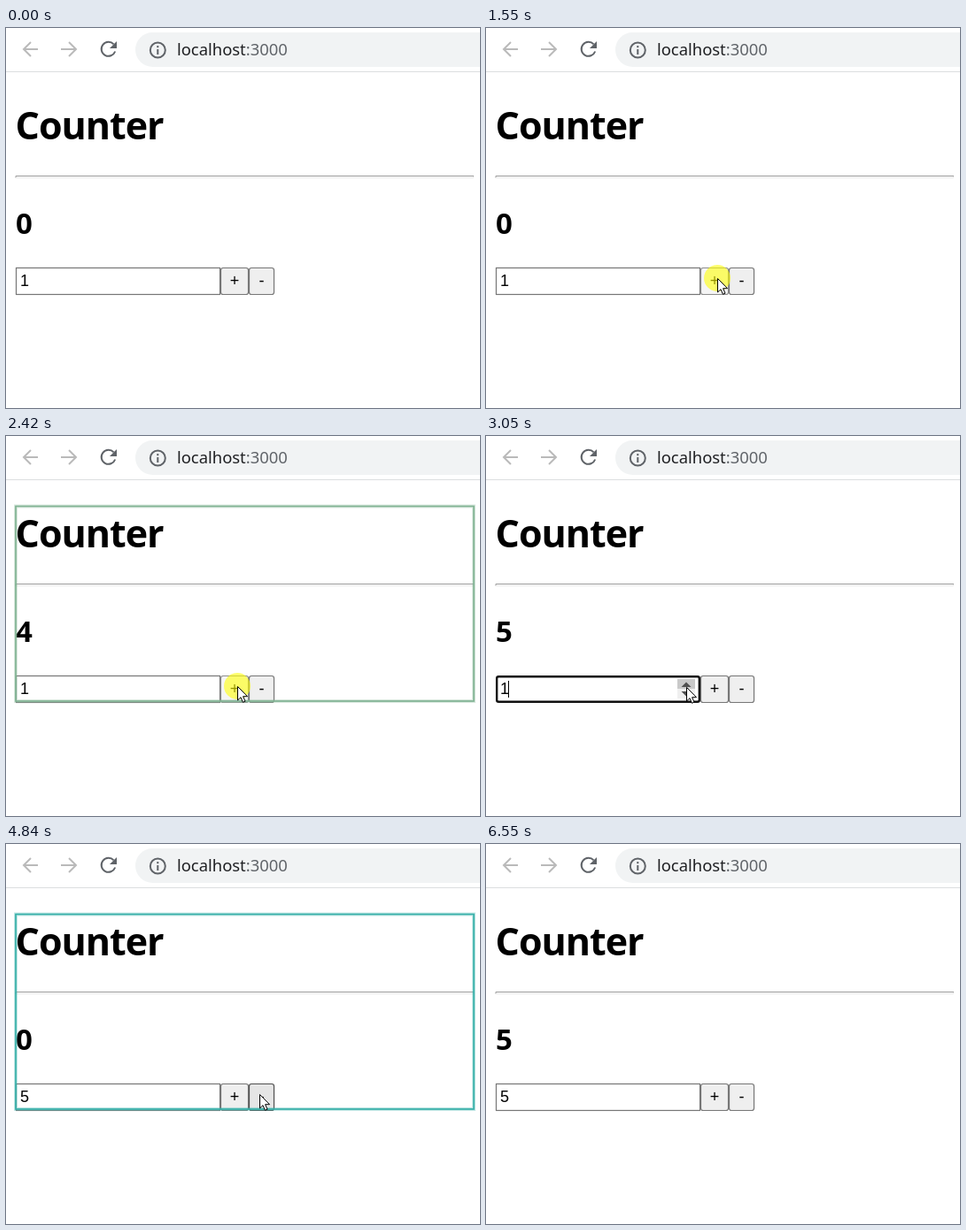
Write an HTML page that moves like this. It is 535 by 430 pixels and loops after 6.87 s.

```html
<!DOCTYPE html>
<html lang="en">
<head>
<meta charset="utf-8">
<title>Counter</title>
<style>
  html, body { margin: 0; width: 100%; height: 100%; overflow: hidden; background: #fff; }
  svg { display: block; width: 535px; height: 430px; }
  .sans { font-family: "Noto Sans", "Open Sans", sans-serif; }
  .bold { font-weight: 700; }
  .control { font: 18px "Liberation Sans", Arial, sans-serif; }
  .button rect { fill: #efefef; stroke: #767676; stroke-width: 1.2; }
  .button.hover rect { fill: #e5e5e5; stroke: #4f4f4f; }
  .button.active rect { fill: #f5f5f5; stroke: #8d8d8d; }
  .icon { fill: none; stroke: #5f6368; stroke-width: 2; }
  .off { stroke: #bababa; }
</style>
</head>
<body>
<svg viewBox="0 0 535 430">
  <!-- Browser toolbar -->
  <path class="icon off" d="M36 24H20M28 16L20 24L28 32"/>
  <path class="icon off" d="M62 24H79M71 16L79 24L71 32"/>
  <path class="icon" d="M121.6 18.4A8 8 0 1 0 123.2 26.5"/>
  <path d="M125 15V23H117Z" fill="#5f6368"/>
  <rect x="146" y="5" width="420" height="39" rx="19.5" fill="#f1f3f4"/>
  <circle class="icon" cx="171.3" cy="25" r="8.5"/>
  <path class="icon" d="M171.3 20V22.2M171.3 24V30"/>
  <text class="sans" x="193" y="31" font-size="18.4" fill="#202124">localhost<tspan fill="#5f6368">:3000</tspan></text>
  <path d="M0 49.5H535" stroke="#dcdee0"/>

  <!-- Page -->
  <text class="sans bold" x="10.5" y="126" font-size="43" letter-spacing="-1">Counter</text>
  <path d="M11 169.5V167.5H528" fill="none" stroke="#9a9a9a"/>
  <path d="M12 169.5H527.5V168" fill="none" stroke="#e8e8e8"/>
  <text class="sans bold" id="count" x="11" y="233" font-size="33"></text>

  <rect id="field" fill="#fff"/>
  <g id="spinner">
    <rect x="216" y="275" width="20" height="22" fill="#efefef"/>
    <rect id="spinUp" x="216" y="275" width="20" height="11" fill="#c9c9c9"/>
    <path d="M220.5 284L226 278.5L231.5 284ZM220.5 289L226 294.5L231.5 289Z" fill="#505050"/>
  </g>
  <text class="control" id="value" x="16" y="292"></text>
  <path id="caret" d="M25.5 277V296" stroke="#000"/>

  <g class="button" id="plus">
    <rect x="242.5" y="271.5" width="31" height="30" rx="2.5"/>
    <text class="control" x="258" y="292" text-anchor="middle">+</text>
  </g>
  <g class="button" id="minus">
    <rect x="274.5" y="271.5" width="28" height="30" rx="2.5"/>
    <text class="control" x="288.5" y="292" text-anchor="middle">-</text>
  </g>

  <g id="outline" fill="none">
    <rect x="11" y="79.5" width="517" height="220.5" stroke-width="4" opacity=".3"/>
    <rect x="11" y="79.5" width="517" height="220.5" stroke-width="1.7"/>
  </g>

  <g id="cursor">
    <circle id="press" r="15" fill="#ff0" opacity=".58"/>
    <path d="M.5 .5V16L4 12.7L6.4 18.3L9 17.2L6.6 11.7H11.5Z" fill="#fff" stroke="#000" stroke-linejoin="round"/>
  </g>
</svg>

<script>
const LOOP = 6870;
const HEAT = ['#37afa9', '#63b19e', '#80b393', '#97b488'];
const el = id => document.getElementById(id);
const at = (x, y) => ({ x, y });
const down = { down: true };
const count = (count, heat) => ({ count, heat, down: false });
const value = (value, heat) => ({ value, heat, down: true });
const up = { down: false };
const cool = { heat: 0 };

const initial = { count: 0, value: 1, heat: 0, x: -99, y: -99, down: false, focus: false };

// Each step changes part of the state from its time on.
const steps = [
  [70, at(319, 374)], [150, at(300, 350)], [220, at(277, 322)], [300, at(261, 302)],
  // Add twice, then subtract twice
  [450, at(260, 284)], [530, down], [610, count(1, 1)], [690, down], [760, count(2, 2)],
  [840, at(270, 286)], [920, at(286, 287)], [1000, { ...down, ...cool }],
  [1070, count(1, 1)], [1150, down], [1230, count(0, 2)],
  // Add up to five
  [1380, at(272, 285)], [1460, { ...at(261, 283), ...cool }], [1540, down], [1620, count(1, 1)],
  [1860, cool], [1940, down],
  [2020, count(2, 1)], [2100, down], [2170, count(3, 2)], [2250, down],
  [2330, count(4, 3)], [2410, down], [2510, count(5, 4)],
  // Raise the step to five
  [2580, at(252, 283)], [2660, at(236, 283)], [2740, { ...at(228, 284), ...cool }],
  [2820, { ...down, focus: true }], [2900, up], [3050, at(226, 284)],
  [3200, value(2, 1)], [3280, up], [3350, value(3, 2)], [3430, up],
  [3590, value(4, 3)], [3670, up], [3750, value(5, 4)],
  [3830, { ...up, ...at(240, 285) }], [3910, at(254, 286)],
  // Add once, then subtract five times
  [3990, { ...down, ...cool, focus: false }], [4070, count(10, 1)],
  [4220, at(262, 284)], [4300, at(275, 283)], [4370, { ...at(286, 283), ...cool }],
  [4530, down], [4610, count(5, 0)],
  [4840, count(0, 1)], [4920, down], [5000, count(-5, 2)], [5070, down],
  [5150, count(-10, 3)], [5230, count(-15, 4)],
  // Add back up to five and leave
  [5310, at(274, 283)], [5390, at(260, 283)], [5470, { ...down, ...cool }],
  [5550, count(-10, 1)], [5700, down], [5780, count(-5, 2)], [5860, down],
  [5930, count(0, 3)], [6090, down], [6240, count(5, 4)],
  [6320, at(275, 384)], [6400, at(-99, -99)], [6550, cool],
];

const show = (id, visible) => { el(id).style.display = visible ? '' : 'none'; };

function setAttributes(id, attributes) {
  for (const name in attributes) el(id).setAttribute(name, attributes[name]);
}

function drawButton(id, hover, pressed) {
  el(id).classList.toggle('hover', hover && !pressed);
  el(id).classList.toggle('active', hover && pressed);
}

function draw(time) {
  const state = { ...initial };
  for (const [start, change] of steps) if (start <= time) Object.assign(state, change);
  const { x, y, focus } = state;
  const over = (left, right) => y >= 271 && y < 302 && x >= left && x < right;

  el('count').textContent = state.count;
  el('value').textContent = state.value;

  const inset = focus ? 1.2 : 0.5;
  setAttributes('field', {
    x: 11 + inset, y: 271 + inset, width: 231 - 2 * inset, height: 31 - 2 * inset,
    rx: focus ? 2 : 0, stroke: focus ? '#101010' : '#767676', 'stroke-width': focus ? 2.4 : 1.2,
  });
  show('caret', focus);
  show('spinner', focus || over(11, 242));
  show('spinUp', over(216, 236) && y < 286);

  drawButton('plus', over(242, 274), state.down);
  drawButton('minus', over(274, 303), state.down);

  show('outline', state.heat > 0);
  if (state.heat) setAttributes('outline', { stroke: HEAT[state.heat - 1] });
  setAttributes('cursor', { transform: `translate(${x} ${y})` });
  show('press', state.down);
}

const startTime = performance.now();
function tick() {
  draw((performance.now() - startTime) % LOOP);
  requestAnimationFrame(tick);
}
tick();
</script>
</body>
</html>
```
